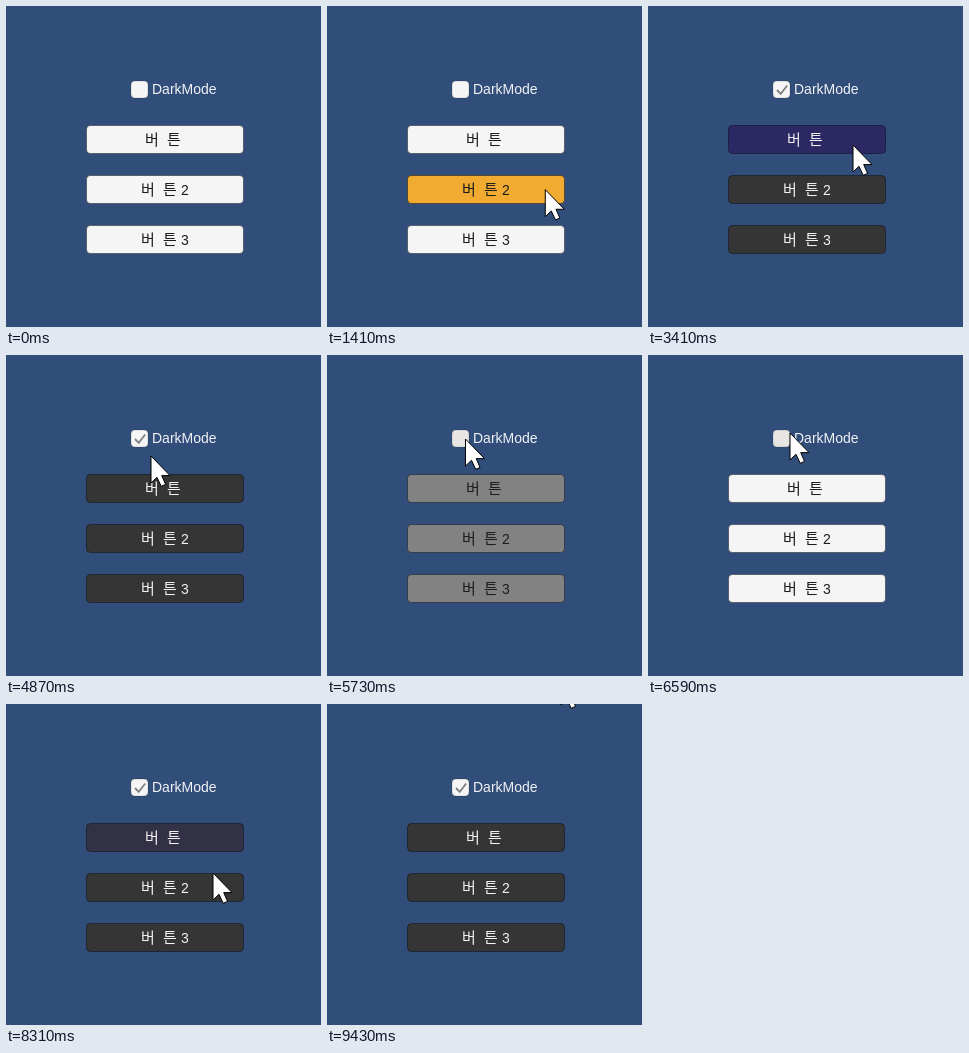
These frames come from a looping animation (315x321 px, 9.5 s). An HTML page:

```html
<!DOCTYPE html>
<html lang="ko">
<meta charset="utf-8">
<title>DarkMode</title>
<style>
  html, body { margin: 0; height: 100%; overflow: hidden; background: #314d79; }
  svg { display: block; width: 315px; height: 321px; }
  text { font: 14px "Liberation Sans", "Noto Sans CJK KR", "Noto Sans CJK", sans-serif; }
  .ko { font-size: 15px; }
</style>
<svg viewBox="0 0 315 321">
  <rect width="315" height="321" fill="#314d79"/>
  <rect id="box" x="125" y="75" width="17" height="17" rx="4" stroke="#000" stroke-opacity=".22" stroke-width=".7"/>
  <path id="check" d="M129 84l3.7 3.8 6.5-8.3" fill="none" stroke="#808080" stroke-width="1.8"/>
  <text x="146" y="88" fill="#f0f2f5">DarkMode</text>
  <g id="buttons"></g>
  <path id="cursor" d="M0 0V27L6 21.3 10.2 30.3 14.6 28.4 10.7 19.6H19Z" fill="#fff" stroke="#000" stroke-linejoin="round"/>
</svg>
<script>
const LOOP = 9500, FADE = 90, SAMPLES = 15;
const LIGHT = [245, 245, 245], AMBER = [240, 171, 48];
const DARK = [53, 53, 53], PURPLE = [43, 40, 100];
const BOX_HOVER = [232, 230, 228];

// Pointer tip: time, x, y
const path = [
  [0, 234, -40], [130, 234, -25], [400, 231, 20], [650, 222, 95], [850, 215, 132],
  [1080, 212, 136], [1400, 218, 182], [1600, 223, 212], [1750, 223, 224],
  [2070, 217, 179], [2300, 214, 171], [2330, 213, 146], [2400, 213, 127],
  [2470, 210, 126], [2660, 138, 84], [3240, 139, 86], [3300, 200, 138],
  [3410, 205, 139], [3700, 208, 180], [3900, 208, 225], [4050, 208, 231],
  [4400, 204, 217], [4600, 185, 180], [4740, 160, 118], [4870, 145, 101],
  [5150, 138, 86], [6320, 139, 82], [6590, 142, 78], [7100, 150, 86],
  [7370, 200, 124], [7500, 206, 140], [7850, 208, 226], [7950, 208, 229],
  [8160, 207, 142], [8255, 207, 148], [8310, 207, 169], [8500, 208, 225],
  [8600, 210, 236], [8800, 220, 180], [9000, 228, 110], [9300, 234, -24],
  [9430, 234, -26], [9500, 234, -26]
];
// Stretches where the picture stands still
const pauses = [[2400, 2470], [2660, 2840], [3240, 3410], [3410, 3470],
  [4870, 4935], [6590, 6655], [8310, 8380], [9430, 9500]];
const toggles = [2840, 5700, 6800];

const $ = id => document.getElementById(id);
const tops = [120, 170, 220];
$('buttons').innerHTML = tops.map((y, i) => `
  <rect x="80.5" y="${y - .5}" width="157" height="28" rx="4" stroke="#000" stroke-opacity=".4"/>
  <text y="${y + 18.5}"><tspan class="ko" x="${i ? '135 157' : '139 161'}">버튼</tspan>${
    i ? `<tspan x="175">${i + 1}</tspan>` : ''}</text>`).join('');
const rects = document.querySelectorAll('#buttons rect');
const labels = document.querySelectorAll('#buttons text');

function tip(t) {
  const i = path.findIndex(k => k[0] > t);
  const [t0, x0, y0] = path[i - 1], [t1, x1, y1] = path[i];
  const p = (t - t0) / (t1 - t0);
  return [x0 + (x1 - x0) * p, y0 + (y1 - y0) * p];
}

const isDark = t => toggles.filter(c => c <= t).length % 2 === 1;
const inside = ([x, y], x0, y0, w, h) => x >= x0 && x < x0 + w && y >= y0 && y < y0 + h;

function buttonColor(t, top) {
  const over = inside(tip(t), 80, top, 158, 28);
  return isDark(t) ? (over ? PURPLE : DARK) : (over ? AMBER : LIGHT);
}
const boxColor = t => inside(tip(t), 125, 74, 90, 19) ? BOX_HOVER : LIGHT;

// A linear fade equals the mean of the state colours over the fade time
function faded(t, color) {
  const sum = [0, 0, 0];
  for (let i = 0; i < SAMPLES; i++)
    color(Math.max(0, t - FADE * i / SAMPLES)).forEach((v, c) => sum[c] += v / SAMPLES);
  return `rgb(${sum.map(Math.round)})`;
}

function draw(now) {
  let t = now % LOOP;
  const pause = pauses.find(([a, b]) => t >= a && t < b);
  if (pause) t = pause[0];
  const dark = isDark(t);
  tops.forEach((top, i) => {
    rects[i].setAttribute('fill', faded(t, s => buttonColor(s, top)));
    labels[i].setAttribute('fill', dark ? '#f2f2f2' : '#1c1c1c');
  });
  $('box').setAttribute('fill', faded(t, boxColor));
  $('check').setAttribute('visibility', dark ? 'visible' : 'hidden');
  $('cursor').setAttribute('transform', `translate(${tip(t)})`);
}

const start = performance.now();
(function frame() {
  draw(Math.max(0, performance.now() - start));
  requestAnimationFrame(frame);
})();
</script>
</html>
```
